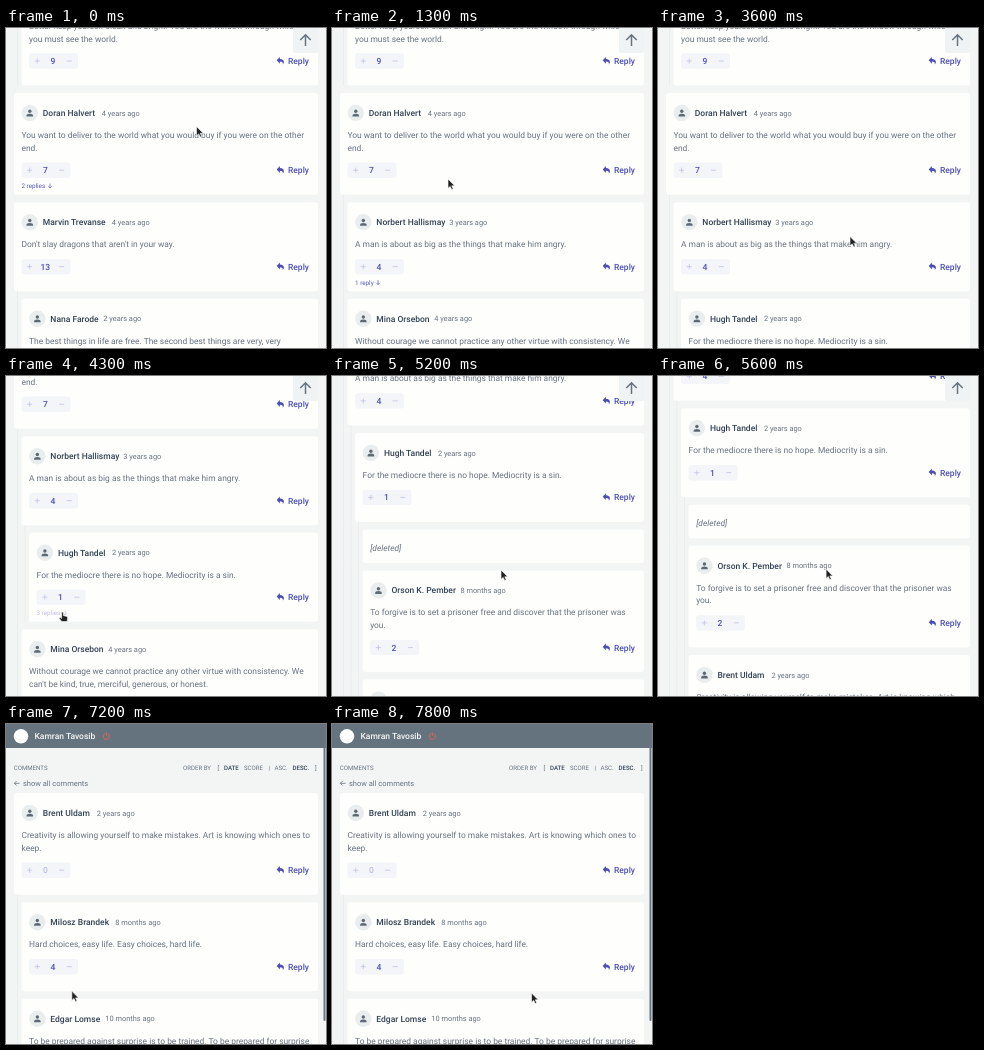
An HTML page for the animation above (8 s loop, 320 by 320 pixels).

```html
<!DOCTYPE html>
<html lang="en">
<head>
<meta charset="utf-8">
<title>Comment thread</title>
<style>
  html, body { margin: 0; width: 100%; height: 100%; overflow: hidden; background: #f3f5f5; }
  svg { display: block; width: 100vw; height: 100vh; }
  text { font-family: Roboto, "Liberation Sans", sans-serif; font-size: 8.42px; fill: #67727e; text-rendering: geometricPrecision; white-space: pre; }
  .name { font-size: 8.5px; font-weight: 500; fill: #324152; }
  .time { font-size: 7.4px; }
  .blue { font-size: 8.5px; font-weight: 500; fill: #4b4fb2; }
  .pale { fill: #b9bbe4; font-weight: 500; }
  .link { font-size: 6.3px; fill: #5357b6; }
  .small { font-size: 6.1px; }
  .strong { font-size: 6.1px; font-weight: 500; fill: #324152; }
  .head { font-size: 8.5px; font-weight: 500; fill: #f4f6f7; }
</style>
</head>
<body>
<svg viewBox="0 0 320 320" xmlns="http://www.w3.org/2000/svg">
  <rect width="320" height="320" fill="#f3f5f5"/>
  <g id="page"></g>
  <g id="top">
    <rect x="287" y="-3" width="25" height="28" rx="2" fill="#f0f3f4"/>
    <path d="M299.5 18V7M294.3 12l5.2-5.2 5.2 5.2" fill="none" stroke="#65737e" stroke-width="1.5"/>
  </g>
  <path id="arrow" d="M0 0V9.3L2.2 7.4 3.7 10.6 5.2 9.9 3.8 6.8H6.7Z" fill="#222" stroke="#fff" stroke-width=".6"/>
  <path id="hand" d="M-.9.6Q0-.5.9.6V3.6L4.3 4.4Q5.3 4.8 5.2 6L4.7 9.6H-.8L-3.3 6.4Q-3.2 5-2 5.6L-.9 6.5Z" fill="#222" stroke="#fff" stroke-width=".6"/>
</svg>
<script>
const LOOP = 8000, STEP = 7.55, GAP = 7.5, LINE = 12.7;
const $ = id => document.getElementById(id);

const post = (level, name, timeX, time, lines, votes) => ({ level, name, timeX, time, lines, votes });
const bright = post(1, "", 0, "", ["Better keep yourself clean and bright. You are the window through which", "you must see the world."], 9);
const deliver = post(0, "Doran Halvert", 59, "4 years ago", ["You want to deliver to the world what you would buy if you were on the other", "end."], 7);
const dragons = post(0, "Marvin Trevanse", 69, "4 years ago", ["Don't slay dragons that aren't in your way."], 13);
const best = post(1, "Nana Farode", 53, "2 years ago", ["The best things in life are free. The second best things are very, very", "expensive."], 5);
const angry = post(1, "Norbert Hallismay", 73, "3 years ago", ["A man is about as big as the things that make him angry."], 4);
const courage = post(1, "Mina Orsebon", 58, "4 years ago", ["Without courage we cannot practice any other virtue with consistency. We", "can't be kind, true, merciful, generous, or honest."], 6);
const hope = post(2, "Hugh Tandel", 54, "2 years ago", ["For the mediocre there is no hope. Mediocrity is a sin."], 1);
const gone = { level: 3, deleted: true };
const forgive = post(3, "Orson K. Pember", 69, "8 months ago", ["To forgive is to set a prisoner free and discover that the prisoner was", "you."], 2);
const create = post(3, "Brent Uldam", 54, "2 years ago", ["Creativity is allowing yourself to make mistakes. Art is knowing which", "ones to keep."], 0);
const createTop = { ...create, level: 0, lines: ["Creativity is allowing yourself to make mistakes. Art is knowing which ones to", "keep."] };
const choices = post(1, "Milosz Brandek", 65, "8 months ago", ["Hard choices, easy life. Easy choices, hard life."], 4);
const prepared = post(1, "Edgar Lomse", 55, "10 months ago", ["To be prepared against surprise is to be trained. To be prepared for surprise", "is to be educated."], 3);

// Each view: start time, first card's top, posts, link owner, link label, arrow, time the link dims
const views = [
  { at: 0, y: -44.2, posts: [bright, deliver, dragons, best], owner: deliver, label: "2 replies", dir: "down", dim: 900 },
  { at: 1000, y: -44.2, posts: [bright, deliver, angry, courage, dragons], owner: angry, label: "1 reply", dir: "down", dim: 2500 },
  { at: 2900, y: -44.2, posts: [bright, deliver, angry, hope, courage, dragons], owner: hope, label: "3 replies", dir: "down", dim: 4300 },
  { at: 4600, y: -44.2, posts: [bright, deliver, angry, hope, gone, forgive, create, courage, dragons], owner: create, label: "3 replies", dir: "right", dim: 6800 },
  { at: 7200, y: 69, posts: [createTop, choices, prepared], header: true }
];

const text = (x, y, str, cls = "", extra = "") => `<text x="${x}" y="${y}" class="${cls}" ${extra}>${str}</text>`;
const rect = (x, y, w, h, fill, r = 0) => `<rect x="${x}" y="${y}" width="${w}" height="${h}" rx="${r}" fill="${fill}"/>`;
const stroke = (d, color, w) => `<path d="${d}" fill="none" stroke="${color}" stroke-width="${w}"/>`;
const height = p => p.deleted ? 33.5 : 76.3 + LINE * p.lines.length;

function link(x, y, v, dimmed) {
  const ax = x + (v.label.length > 7 ? 28.5 : 23);
  const d = v.dir === "down"
    ? `M${ax} ${y - 4.6}v4.4m-1.7-1.7l1.7 1.7 1.7-1.7`
    : `M${ax - 1} ${y - 2.1}h4.6m-1.7-1.7l1.7 1.7-1.7 1.7`;
  return `<g opacity="${dimmed ? .38 : 1}">${text(x, y, v.label, "link")}${stroke(d, "#5357b6", .7)}</g>`;
}

function card(p, y, v, dimmed) {
  const x = 8 + p.level * STEP, h = height(p), inner = x + 7.5;
  let s = "";
  for (let i = 0; i < p.level; i++) s += rect(11 + i * STEP, y - GAP, 1, h + GAP, "#eaedee");
  s += rect(x, y, 312 - x, h, "#fefefd", 3);
  if (p.deleted) return s + text(inner, y + 21.6, "[deleted]", "", 'font-style="italic"');
  const cx = x + 15.8, cy = y + 20, py = y + 51.8 + LINE * p.lines.length;
  s += `<circle cx="${cx}" cy="${cy}" r="8.2" fill="#e9edee"/>
    <circle cx="${cx}" cy="${cy - 1.7}" r="1.7" fill="#5d6a75"/>
    <path d="M${cx - 3.3} ${cy + 3.6}v-.9q0-2 3.3-2t3.3 2v.9z" fill="#5d6a75"/>`;
  s += text(x + 28.8, y + 23, p.name, "name") + text(x + 28.8 + p.timeX, y + 22.7, p.time, "time");
  p.lines.forEach((l, i) => s += text(inner, y + 45 + i * LINE, l));
  s += rect(inner, py - 7.7, 49, 15.4, "#f4f5f8", 3);
  s += stroke(`M${x + 13.2} ${py}h5m-2.5-2.5v5M${x + 45.2} ${py}h5`, "#c5c7ea", .9);
  s += text(x + 31.3, py + 3, p.votes, p.votes ? "blue" : "pale", 'text-anchor="middle"');
  s += `<path d="M273.9 ${py - 4.1}v2q4 .2 4 3.2 0 1.5-1.1 2.3.6-2.7-2.9-2.8v2.1l-3.2-3.4z" fill="#4b4fb2"/>`;
  s += text(282, py + 3, "Reply", "blue");
  if (p === v.owner) s += link(inner, py + 18, v, dimmed);
  return s;
}

function header() {
  const row = [[177, "ORDER BY"], [211.5, "["], [218, "DATE", 1], [238, "SCORE"], [262.5, "|"], [268.5, "ASC."], [286.5, "DESC.", 1], [309, "]"]];
  return rect(0, 0, 320, 24, "#65737e")
    + '<circle cx="15" cy="12.3" r="7.2" fill="#fff"/>'
    + text(28.5, 15.4, "Kamran Tavosib", "head")
    + stroke("M98.9 9.6a3.1 3.1 0 1 0 2.8 0M100.3 8.5v3.6", "#e2664f", 1)
    + text(7.8, 46.2, "COMMENTS", "small")
    + row.map(([x, s, b]) => text(x, 46.2, s, b ? "strong" : "small")).join("")
    + stroke("M13.6 59.3h-5.2m2.2-2.2l-2.2 2.2 2.2 2.2", "#67727e", .8)
    + text(17, 62, "show all comments", "", 'style="font-size:7.5px"')
    + rect(317.5, 0, 2, 297, "#6b7780", 1);
}

function build(v, dimmed) {
  let y = v.y, s = v.header ? header() : "";
  for (const p of v.posts) {
    s += card(p, y, v, dimmed);
    y += height(p) + GAP;
  }
  return s;
}

// Keys: [time, ...values]; eased between neighbours
const ease = k => k * k * (3 - 2 * k);
function track(keys, t) {
  let i = 0;
  while (i < keys.length - 2 && t >= keys[i + 1][0]) i++;
  const [a, b] = [keys[i], keys[i + 1]];
  const k = ease(Math.min(1, Math.max(0, (t - a[0]) / (b[0] - a[0]))));
  return a.slice(1).map((n, j) => n + (b[j + 1] - n) * k);
}
const pointer = [
  [0, 190.5, 98.5], [900, 36, 157], [950, 36, 157], [1300, 116, 151], [1500, 149, 150],
  [1600, 149, 150], [2500, 38, 256], [2700, 38, 254], [2800, 38, 254], [3300, 192, 208.5],
  [3700, 192, 208.5], [4300, 56.5, 236], [4600, 56.5, 236], [5200, 169, 194], [5700, 168, 193],
  [6300, 91, 258], [6800, 58, 267], [7100, 58, 267], [7800, 199.5, 269]
];
const scroll = [[3600, 0], [4100, 114], [4700, 114], [5400, 238.5], [5600, 238.5], [6200, 342]];
const hands = [[800, 1000], [2400, 2900], [4200, 4700], [6700, 7200]];

let shown = "";
function draw(ms) {
  const t = Math.floor((ms % LOOP) / 100 + .001) * 100;
  const n = views.filter(v => v.at <= t).length - 1, v = views[n];
  const dimmed = t >= v.dim, key = n + "/" + dimmed;
  if (key !== shown) {
    shown = key;
    $("page").innerHTML = build(v, dimmed);
  }
  const [sy] = v.header ? [0] : track(scroll, t);
  $("page").setAttribute("transform", `translate(0 ${-sy})`);
  $("top").style.display = v.header ? "none" : "";
  const [x, y] = track(pointer, t);
  const hand = hands.some(([a, b]) => t >= a && t < b);
  for (const id of ["arrow", "hand"]) {
    $(id).setAttribute("transform", `translate(${x} ${y})`);
    $(id).style.display = (id === "hand") === hand ? "" : "none";
  }
}

let start;
function tick(now) {
  start ??= now;
  draw(now - start);
  requestAnimationFrame(tick);
}
draw(0);
requestAnimationFrame(tick);
</script>
</body>
</html>
```
